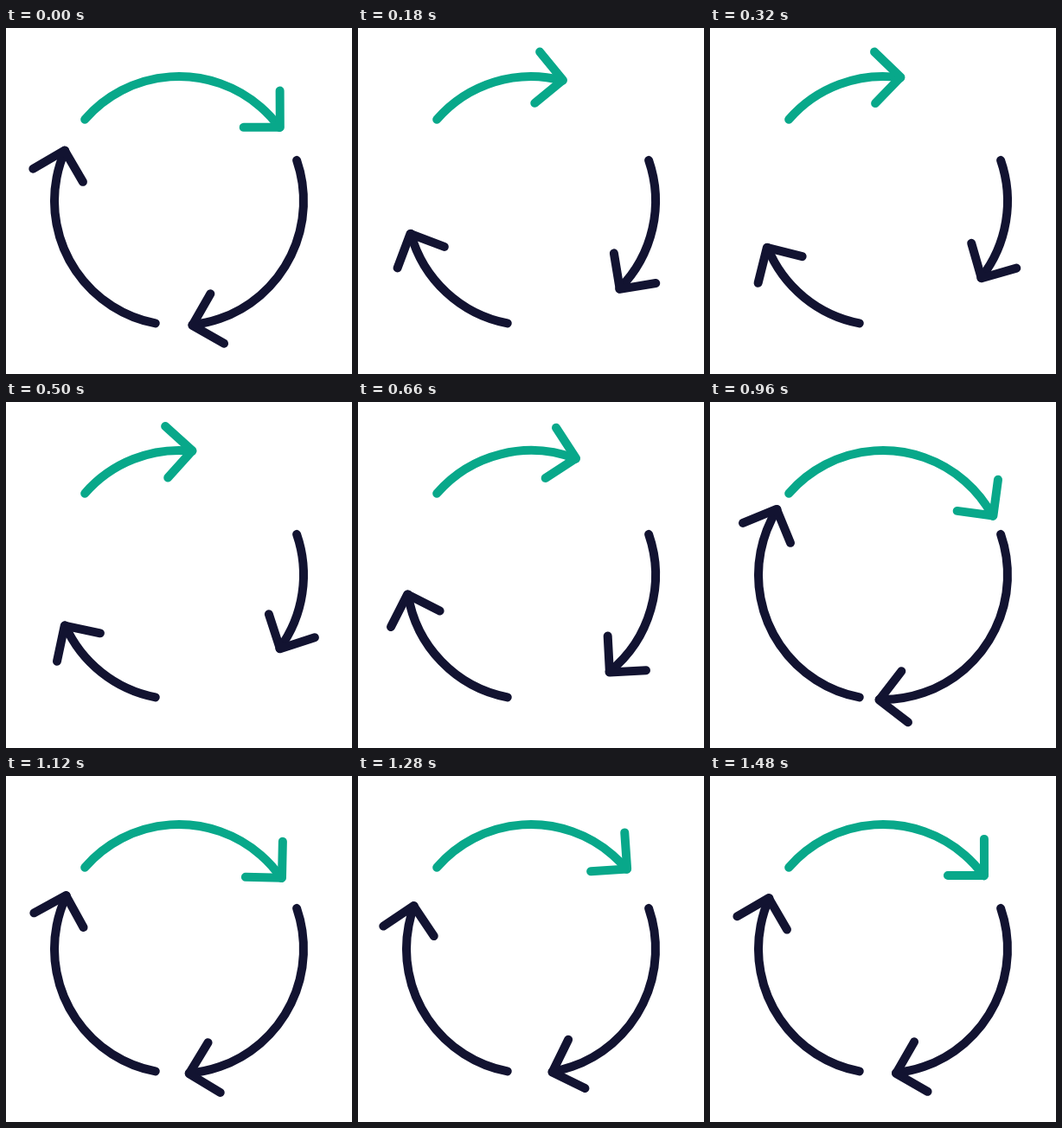
Write an HTML page with a canvas that moves like this. It is 400 px wide and 400 px high and loops after 1.5 s.

```html
<!DOCTYPE html>
<html lang="en">
<head>
<meta charset="utf-8">
<title>Cycle arrows</title>
<style>
  html, body { margin: 0; width: 100%; height: 100%; overflow: hidden; background: #fff; }
  canvas { display: block; width: 400px; height: 400px; }
</style>
</head>
<body>
<canvas id="stage" width="400" height="400"></canvas>
<script>
const ctx = document.getElementById('stage').getContext('2d');
const LOOP = 1500;
const RADIUS = 144;
const TIP = { x: 117.2, y: -84.8 };
const ARM = 42.1;
const NAVY = '#121331';
const GREEN = '#08a88a';
const rad = degrees => degrees * Math.PI / 180;
const TAIL_ANGLE = rad(-139.1);
const TIP_ANGLE = Math.atan2(TIP.y, TIP.x);

function bezier(x1, y1, x2, y2) {
  const at = (a, b, s) => 3 * (1 - s) * (1 - s) * s * a + 3 * (1 - s) * s * s * b + s * s * s;
  return x => {
    let low = 0, high = 1;
    for (let i = 0; i < 30; i++) {
      const mid = (low + high) / 2;
      if (at(x1, x2, mid) < x) low = mid; else high = mid;
    }
    return at(y1, y2, (low + high) / 2);
  };
}

const smooth = bezier(1 / 3, 0, 2 / 3, 1);

// Swing of the arrowheads in degrees: pull back, overshoot, settle.
const swing = [
  { start: 0, end: 500, from: 0, to: -48, ease: bezier(0.15, 0.4, 0.1, 1) },
  { start: 500, end: 900, from: -48, to: 8.4, ease: bezier(0.494, 0, 0.638, 1) },
  { start: 900, end: 1300, from: 8.4, to: -4, ease: smooth },
  { start: 1300, end: LOOP, from: -4, to: 0, ease: smooth }
];

function swingAt(time) {
  const { start, end, from, to, ease } = swing.find(part => time < part.end);
  return rad(from + (to - from) * ease((time - start) / (end - start)));
}

function drawArrow(turn, color, angle) {
  ctx.save();
  ctx.rotate(rad(turn));
  ctx.strokeStyle = color;
  ctx.beginPath();
  ctx.arc(0, 0, RADIUS, TAIL_ANGLE, TIP_ANGLE + angle);
  ctx.stroke();
  ctx.rotate(angle);
  ctx.beginPath();
  ctx.moveTo(TIP.x, TIP.y - ARM);
  ctx.lineTo(TIP.x, TIP.y);
  ctx.lineTo(TIP.x - ARM, TIP.y);
  ctx.stroke();
  ctx.restore();
}

function render(now) {
  const angle = swingAt(now % LOOP);
  ctx.fillStyle = '#fff';
  ctx.fillRect(0, 0, 400, 400);
  ctx.save();
  ctx.translate(200, 200);
  ctx.lineWidth = 10;
  ctx.lineCap = ctx.lineJoin = 'round';
  drawArrow(120, NAVY, angle);
  drawArrow(240, NAVY, angle);
  drawArrow(0, GREEN, angle);
  ctx.restore();
}

const origin = performance.now();
function tick() {
  render(performance.now() - origin);
  requestAnimationFrame(tick);
}
tick();
</script>
</body>
</html>
```
